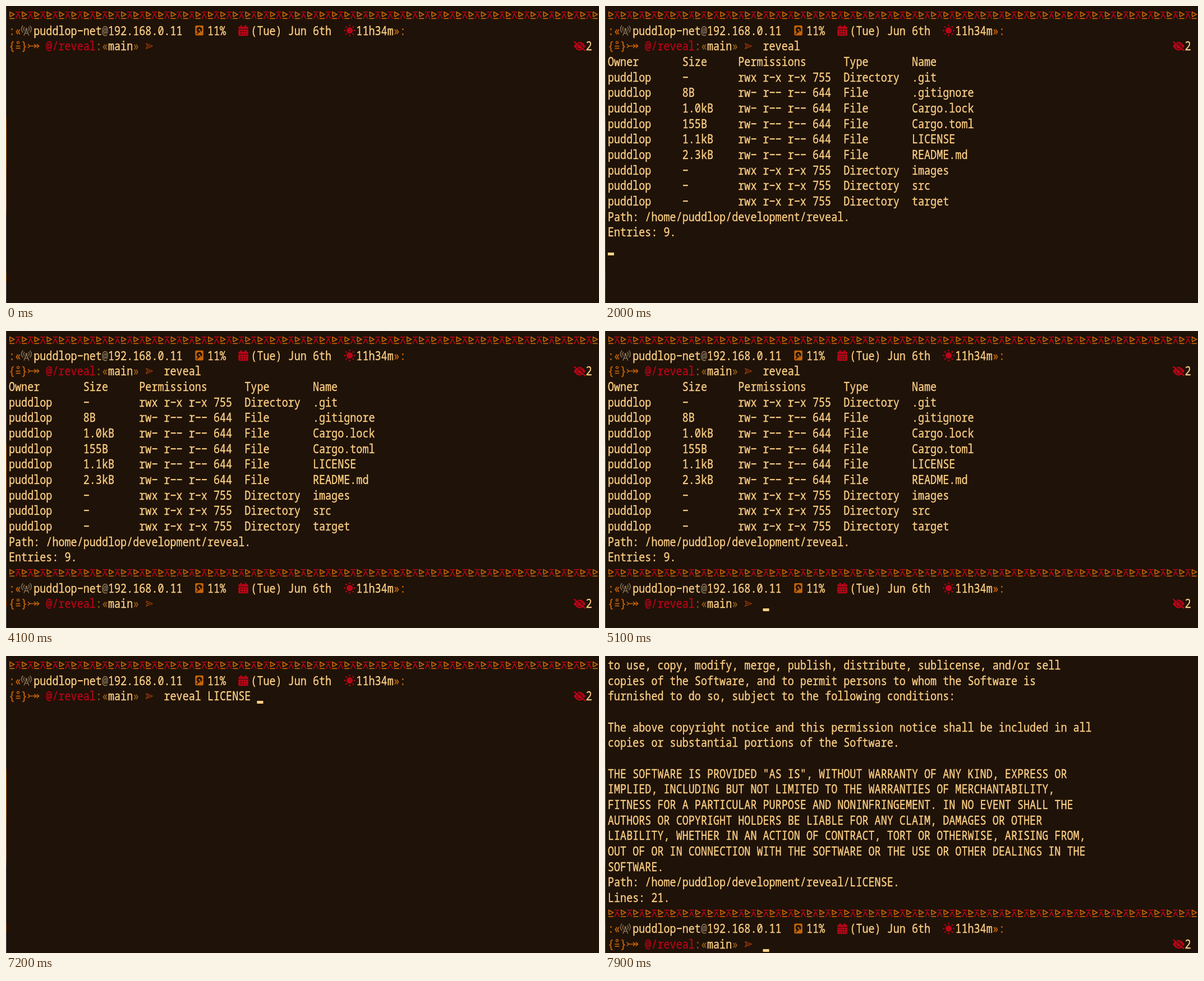
Write an HTML page with a canvas that moves like this. It is 1057 px wide and 530 px high and loops after 8000 ms.

```html
<!DOCTYPE html>
<html lang="en">
<head>
<meta charset="utf-8">
<title>Terminal</title>
<style>
  html, body { margin: 0; width: 100%; height: 100%; overflow: hidden; background: #1f1208; }
  canvas { display: block; }
</style>
</head>
<body>
<canvas id="stage" width="1057" height="530"></canvas>
<script>
const ctx = document.getElementById('stage').getContext('2d');
const W = 1057, H = 530, LOOP = 8000, TICK = 100;
const CW = 11.06, RH = 27.67, COLS = 95;
const BG = '#1f1208', FG = '#fdd085', ORANGE = '#c66408', RED = '#b80518';
const BROWN = '#8f5c1a', GREY = '#85735a', RUST = '#a63e0c';
const FONT = '18.4px "Noto Sans Mono", "DejaVu Sans Mono", monospace';
const USER = 'puddlop';
const TAU = Math.PI * 2;

const colX = c => 5 + c * CW;
const baseY = r => 24 + r * RH;

const DIR = ['-', 'rwx r-x r-x 755', 'Directory'];
const file = size => [size, 'rw- r-- r-- 644', 'File'];
const ENTRIES = [
  [...DIR, '.git'], [...file('8B'), '.gitignore'], [...file('1.0kB'), 'Cargo.lock'],
  [...file('155B'), 'Cargo.toml'], [...file('1.1kB'), 'LICENSE'], [...file('2.3kB'), 'README.md'],
  [...DIR, 'images'], [...DIR, 'src'], [...DIR, 'target']
];
const TABLE_COLS = [0, 12, 21, 38, 49];

const LICENSE = `of this software and associated documentation files (the "Software"), to deal
in the Software without restriction, including without limitation the rights
to use, copy, modify, merge, publish, distribute, sublicense, and/or sell
copies of the Software, and to permit persons to whom the Software is
furnished to do so, subject to the following conditions:

The above copyright notice and this permission notice shall be included in all
copies or substantial portions of the Software.

THE SOFTWARE IS PROVIDED "AS IS", WITHOUT WARRANTY OF ANY KIND, EXPRESS OR
IMPLIED, INCLUDING BUT NOT LIMITED TO THE WARRANTIES OF MERCHANTABILITY,
FITNESS FOR A PARTICULAR PURPOSE AND NONINFRINGEMENT. IN NO EVENT SHALL THE
AUTHORS OR COPYRIGHT HOLDERS BE LIABLE FOR ANY CLAIM, DAMAGES OR OTHER
LIABILITY, WHETHER IN AN ACTION OF CONTRACT, TORT OR OTHERWISE, ARISING FROM,
OUT OF OR IN CONNECTION WITH THE SOFTWARE OR THE USE OR OTHER DEALINGS IN THE
SOFTWARE.
Path: /home/${USER}/development/reveal/LICENSE.
Lines: 21.`.split('\n');

// Time of each key press and the command line after it
const KEYS = [
  [0, ''], [1100, 'r'], [1300, 're'], [1500, 'rev'], [1600, 'reve'], [1700, 'revea'], [1800, 'reveal'],
  [5500, ''], [5900, 'r'], [6000, 're'], [6200, 'rev'], [6300, 'revea'], [6400, 'reveal'],
  [6700, 'reveal '], [7100, 'reveal L'], [7200, 'reveal LICENSE ']
];
const typed = t => KEYS.filter(k => k[0] <= t).pop()[1];

function cursorOn(t) {
  if (t < 1000) return t % 300 >= 100 && t % 300 < 200;
  if (t >= 2100 && t < 5100) return t % 300 < 200;
  return !(t >= 5800 && t < 5900) && !(t >= 7800 && t < 7900);
}

// Text on the cell grid, in a tall terminal face with wide, raised hyphens
function put(str, c, r, color = FG) {
  ctx.fillStyle = ctx.strokeStyle = color;
  ctx.save();
  ctx.translate(0, baseY(r));
  ctx.scale(1, 1.23);
  ctx.lineWidth = 0.3;
  [...str.replace(/-/g, '\u2212')].forEach((ch, i) => {
    if (ch === ' ') return;
    ctx.fillText(ch, colX(c + i), 0);
    ctx.strokeText(ch, colX(c + i), 0);
  });
  ctx.restore();
}

// Local drawing space: cell's left edge, baseline
function at(c, r, color, draw) {
  ctx.save();
  ctx.translate(colX(c), baseY(r));
  ctx.fillStyle = ctx.strokeStyle = color;
  ctx.lineWidth = 1.7;
  draw();
  ctx.restore();
}

function line(...p) {
  ctx.beginPath();
  for (let i = 0; i < p.length; i += 2) ctx.lineTo(p[i], p[i + 1]);
  ctx.stroke();
}

function arc(x, y, r, from = 0, to = TAU) {
  ctx.beginPath();
  ctx.arc(x, y, r, from, to);
}

function dot(x, y, r) {
  arc(x, y, r);
  ctx.fill();
}

function box(x, y, w, h, r) {
  ctx.beginPath();
  ctx.roundRect(x, y, w, h, r);
  ctx.fill();
}

function tower() {
  ctx.lineWidth = 1.5;
  line(4.8, 1, 9.3, -10, 13.8, 1);
  line(6.3, -3, 12.3, -3);
  dot(9.3, -10.5, 1.8);
  for (const r of [5, 8.7]) {
    arc(9.3, -10.5, r, -0.8, 0.8);
    ctx.stroke();
    arc(9.3, -10.5, r, Math.PI - 0.8, Math.PI + 0.8);
    ctx.stroke();
  }
}

function disk() {
  box(0.5, -16.8, 14.5, 17.6, 2);
  ctx.fillStyle = ctx.strokeStyle = BG;
  dot(7.8, -9.5, 5);
  line(7.5, -6, 3, -1.5);
  ctx.fillStyle = ORANGE;
  dot(7.8, -9.5, 1.4);
  ctx.strokeStyle = ORANGE;
  line(8.5, -8.5, 11, -4);
}

function calendar() {
  box(0, -15, 17.5, 16.5, 2);
  ctx.fillRect(3.5, -17.5, 2.4, 4);
  ctx.fillRect(11.6, -17.5, 2.4, 4);
  ctx.fillStyle = BG;
  ctx.fillRect(0, -10.8, 17.5, 1);
  for (let i = 0; i < 6; i++) ctx.fillRect(3.5 + (i % 3) * 4.3, -7 + (i > 2) * 4.2, 1.9, 1.9);
}

function sun() {
  dot(10.3, -8, 5.6);
  ctx.lineWidth = 2.4;
  for (let i = 0; i < 8; i++) {
    const x = Math.cos(i * TAU / 8), y = Math.sin(i * TAU / 8);
    line(10.3 + x * 7.6, -8 + y * 7.6, 10.3 + x * 10.2, -8 + y * 10.2);
  }
}

function hiddenEye() {
  ctx.beginPath();
  ctx.moveTo(0.5, -7.5);
  ctx.quadraticCurveTo(11, -23, 21.5, -7.5);
  ctx.quadraticCurveTo(11, 8, 0.5, -7.5);
  ctx.fill();
  ctx.strokeStyle = BG;
  ctx.lineWidth = 1.1;
  arc(11, -7.5, 4.6);
  ctx.stroke();
  line(2.5, -17, 22.5, -0.8);
  ctx.strokeStyle = RED;
  ctx.lineWidth = 2.2;
  line(1, -16, 21, 0.8);
}

function ringEqual() {
  line(1.6, -7.8, 9.4, -7.8);
  line(1.6, -3.9, 9.4, -3.9);
  ctx.lineWidth = 1.3;
  arc(5.5, -14.3, 2);
  ctx.stroke();
}

function tailedArrow() {
  ctx.lineWidth = 1.5;
  line(3.5, -7.9, 20.5, -7.9);
  line(0.8, -11.2, 4.2, -7.9, 0.8, -4.6);
  line(12, -11.4, 15.7, -7.9, 12, -4.4);
  line(16.8, -11.4, 20.5, -7.9, 16.8, -4.4);
}

function arrowhead() {
  ctx.lineWidth = 1.2;
  ctx.lineJoin = 'round';
  line(1.2, -12.6, 13, -7.9, 1.2, -3.2, 4, -7.9, 1.2, -12.6);
  line(4, -7.9, 8, -7.9);
}

function divider(r) {
  for (let c = 0; c < COLS; c++) {
    if (c % 2) at(c, r, RED, () => {
      line(1, -13.2, 10, -13.2);
      line(1.3, -1.2, 5.5, -10.3, 9.7, -1.2);
    });
    else at(c, r, ORANGE, () => {
      line(1.9, -5, 1.9, -13.2, 9.6, -9, 1.9, -4.8);
      line(1, -1.7, 10, -1.7);
    });
  }
}

function prompt(r, command) {
  divider(r);

  const s = r + 1;
  put(':«', 0, s, ORANGE);
  at(2, s, GREY, tower);
  put(USER + '-net', 4, s);
  put('@', 15, s, GREY);
  put('192.168.0.11', 16, s);
  at(30, s, ORANGE, disk);
  put('11%', 32, s);
  at(37, s, RED, calendar);
  put('(Tue) Jun 6th', 39, s);
  at(54, s, RED, sun);
  put('11h34m', 56, s);
  put('»:', 62, s, ORANGE);

  const p = r + 2;
  put('{ }', 0, p, ORANGE);
  at(1, p, ORANGE, ringEqual);
  at(3, p, ORANGE, tailedArrow);
  put('@/reveal', 6, p, RED);
  put(':«', 14, p, BROWN);
  put('main', 16, p);
  put('»', 20, p, BROWN);
  at(22, p, RUST, arrowhead);
  put(command, 25, p);
  at(91, p, RED, hiddenEye);
  put('2', 93, p);
}

function listing() {
  const rows = [['Owner', 'Size', 'Permissions', 'Type', 'Name'], ...ENTRIES.map(e => [USER, ...e])];
  rows.forEach((row, i) => row.forEach((s, j) => put(s, TABLE_COLS[j], 3 + i)));
  put(`Path: /home/${USER}/development/reveal.`, 0, 13);
  put('Entries: 9.', 0, 14);
}

function cursor(c, r) {
  ctx.fillStyle = FG;
  ctx.fillRect(colX(c), Math.round(baseY(r)) + 1, CW, 5);
}

// Sliver of the desktop behind the window
function edge() {
  const g = ctx.createLinearGradient(0, 0, 0, H);
  [[0, '#4a4440'], [0.24, '#4c4a4c'], [0.37, '#55504c'], [0.39, '#a8641c'], [0.53, '#b06a22'],
   [0.58, '#8a6444'], [0.68, '#8a6a50'], [0.72, '#4c4c52'], [0.89, '#55504c'], [0.91, '#a05a14'],
   [0.925, '#a05a14'], [0.93, '#55585c'], [1, '#55585c']].forEach(s => g.addColorStop(...s));
  ctx.fillStyle = g;
  ctx.fillRect(0, 0, 1, H);
}

function render(t) {
  ctx.fillStyle = BG;
  ctx.fillRect(0, 0, W, H);
  edge();
  ctx.font = FONT;

  const command = typed(t);
  let pos = [25 + command.length, 2];
  if (t >= 7600) {
    const done = t >= 7700, shift = done ? 2 : 0;
    LICENSE.forEach((s, i) => { if (i >= shift) put(s, 0, i - shift); });
    if (done) prompt(16, '');
    pos = [done ? 25 : 0, 18];
  } else {
    prompt(0, command);
    if (t >= 2000 && t < 5500) {
      const done = t >= 2100;
      listing();
      if (done) prompt(15, '');
      pos = done ? [25, 17] : [0, 15];
    }
  }
  if (cursorOn(t)) cursor(...pos);
}

let last = -1;
function loop() {
  const tick = Math.floor(performance.now() % LOOP / TICK);
  if (tick !== last) render((last = tick) * TICK);
  requestAnimationFrame(loop);
}
loop();
</script>
</body>
</html>
```
